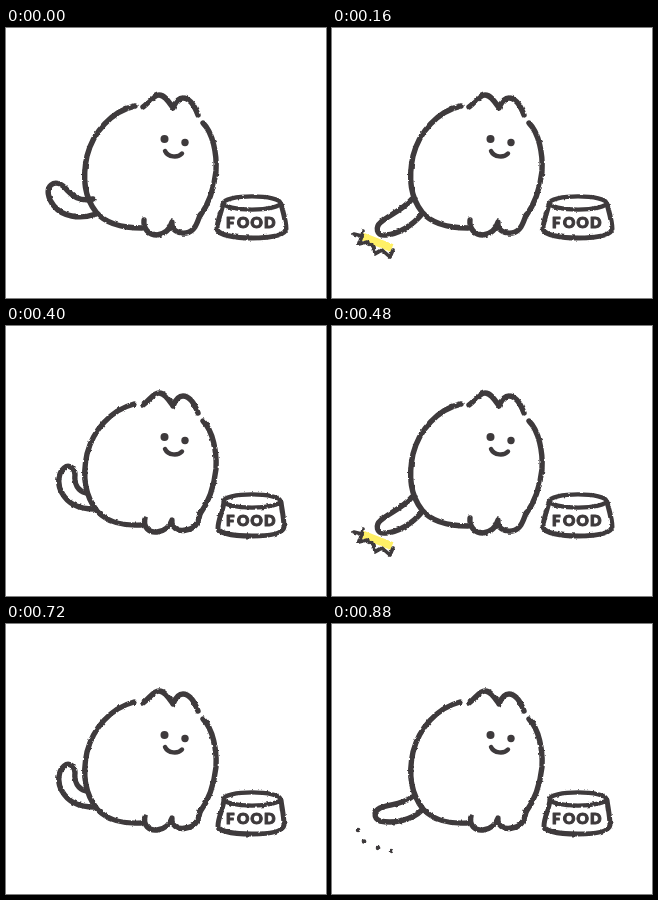
Write an HTML page that moves like this. It is 320x270 px and loops after 960 ms.

```html
<!DOCTYPE html>
<html lang="en">
<head>
<meta charset="utf-8">
<title>Waiting for food</title>
<style>
  html, body { margin: 0; width: 100%; height: 100%; overflow: hidden; background: #fff; }
  svg { display: block; width: 320px; height: 270px; }
  .ink { fill: none; stroke: #3e3a3c; stroke-width: 5.4; stroke-linecap: round; stroke-linejoin: round; }
  .dot { fill: #3e3a3c; stroke: none; }
  text { font: 900 15px Lato, sans-serif; fill: #3e3a3c; stroke-width: 1; }
</style>
</head>
<body>
<svg viewBox="0 0 320 270">
  <filter id="crayon" filterUnits="userSpaceOnUse" x="0" y="0" width="320" height="270" color-interpolation-filters="sRGB">
    <feTurbulence id="grain" type="fractalNoise" baseFrequency=".25" numOctaves="2" seed="1"/>
    <feDisplacementMap in="SourceGraphic" scale="2.6" xChannelSelector="R" yChannelSelector="G"/>
  </filter>
  <g class="ink">
    <g filter="url(#crayon)">
      <path id="tail"/>
      <path id="body"/>
      <path d="M137 79C143 75 147 67 153 67C159 67 163 74 167 80C169 75 172 70 177 70C184 70 189 79 192 87"/>
      <path d="M197 95C207 105 211 126 210 143C208 161 202 177 194 188"/>
      <path id="feet"/>
      <ellipse cx="246" cy="175" rx="28.5" ry="6.6" style="stroke-width:4.2"/>
      <path id="side" style="stroke-width:5"/>
      <g id="hit">
        <path d="M29 208L60 220" style="stroke:#fff066;stroke-width:8;stroke-linecap:butt"/>
        <path d="M22 206L30 208M31 203L30 208L27 216L35 214L42 219L43 226L50 222L58 229L61 222" style="stroke-width:3.6"/>
      </g>
      <path id="specks" d="M26 206h.1M32 217.5h.1M46 224h.1M59 227h.1" style="stroke-width:4.6"/>
    </g>
    <circle class="dot" cx="158.5" cy="111" r="4"/>
    <circle class="dot" cx="179" cy="114.5" r="3.7"/>
    <path d="M159 123C162 129.500 172 130 176 125.500" style="stroke-width:4.4"/>
    <text x="220 231 244.5 258" y="199.5">FOOD</text>
  </g>
</svg>
<script>
const $ = id => document.getElementById(id);
const STEP = 80;

// Tail poses: half way, raised, slapping the floor, bouncing back
const tails = [
  'M87 171C73 174 67 168 61 162C56 156 50 153 45 157C40 161 42 171 48 178C56 188 73 192 90 186',
  'M80 167C72 165 68 158 69 149C69 142 63 138 58 142C52 147 51 159 56 167C62 178 74 183 88 183',
  'M80 171C73 180 58 187 49 194C43 199 44 208 54 207C66 206 80 198 90 186',
  'M80 173C70 181 57 180 48 184C42 187 41 194 48 197C62 200 80 196 90 186'
];

// Two slightly different drawings alternate
const looks = [
  {
    body: 'M129 78C106 83 87 104 81 128C76 151 79 170 90 184C100 196 118 200 136 200',
    feet: 'M138 192C137 201 143 207 151 207C159 206 164 201 166 194C165 202 172 206 180 205C188 204 191 196 194 187',
    side: 'M217 176C215 185 211 194 211 201C212 207 229 210 246 210C263 210 279 208 280 201C280 193 277 184 275 176'
  },
  {
    body: 'M128 78C105 84 87 104 81 128C76 151 80 171 91 185C101 196 118 200 135 199',
    feet: 'M139 193C137 201 143 207 151 206C159 205 164 200 166 194C165 201 171 206 180 204C188 203 193 197 194 187',
    side: 'M218 176C217 185 212 194 212 202C213 208 229 210 246 210C262 210 277 208 278 201C278 193 276 184 275 176'
  }
];

let shown = -1;
function draw(now) {
  const pose = Math.floor(now / STEP) % tails.length;
  if (pose === shown) return;
  shown = pose;
  const look = looks[pose % 2];
  for (const part in look) $(part).setAttribute('d', look[part]);
  $('tail').setAttribute('d', tails[pose]);
  $('grain').setAttribute('seed', 3 + pose % 2 * 5);
  $('hit').style.display = pose === 2 ? '' : 'none';
  $('specks').style.display = pose === 3 ? '' : 'none';
}

const start = performance.now();
function tick() {
  draw(performance.now() - start);
  requestAnimationFrame(tick);
}
tick();
</script>
</body>
</html>
```
